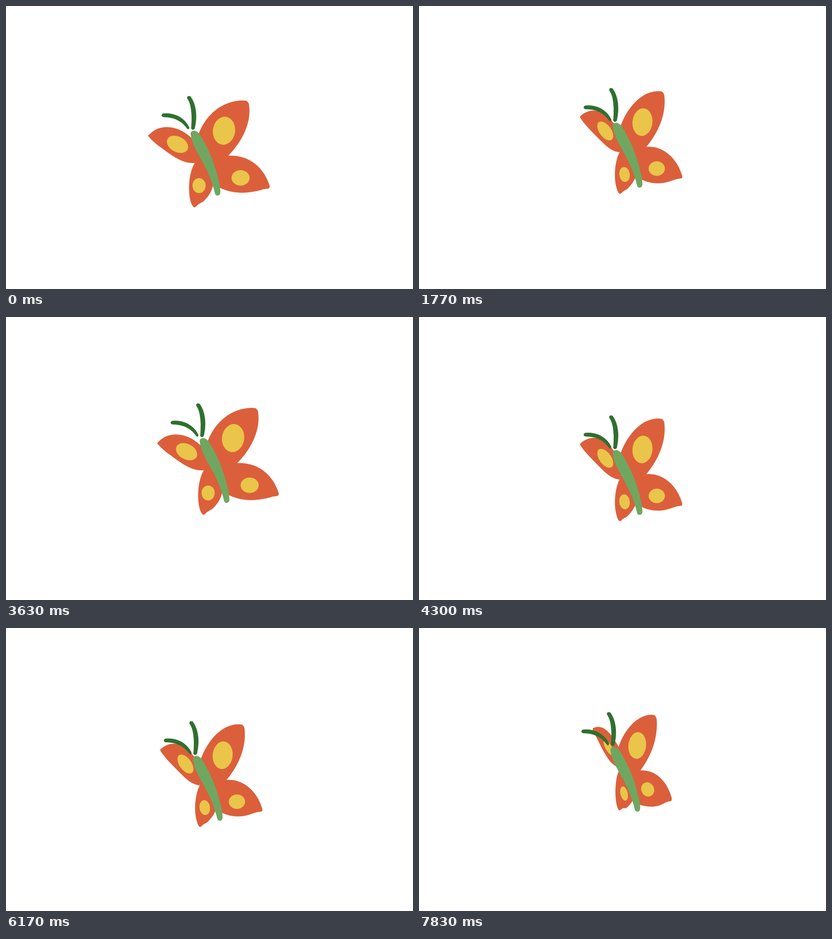
These frames come from a looping animation (897x624 px, 7910 ms). An HTML page:

```html
<!DOCTYPE html>
<html lang="en">
<head>
<meta charset="utf-8">
<title>Butterfly</title>
<style>
  html, body { margin: 0; width: 100%; height: 100%; overflow: hidden; background: #fff; }
  svg { display: block; width: 897px; height: 624px; }
  .wings { fill: #dc5f3b; display: none; }
  .wings.on { display: inline; }
  .wings ellipse { fill: #e9c54a; }
</style>
</head>
<body>
<svg viewBox="0 0 897 624">
  <g id="butterfly">
    <!-- open -->
    <g class="wings">
      <path d="M424 283C438 246 466 219 500 211Q517 207 530 209Q536 213 536 221C540 255 524 295 490 330L455 350Z"/>
      <path d="M490 330C535 328 568 355 581 396Q582 403 576 403C567 403 560 407 553 408C520 415 492 412 468 399L440 335Z"/>
      <path d="M313 286C318 281 325 275 331 272C355 261 385 268 409 291L440 345L416 346C390 348 370 333 340 311C330 304 318 293 313 286Z"/>
      <path d="M416 346C405 364 401 395 405 422Q407 436 413 443Q416 446 421 440C426 435 432 434 437 429C448 418 454 408 457 392L440 335Z"/>
      <ellipse rx="24.5" ry="31" transform="translate(480.5 275) rotate(8)"/>
      <ellipse rx="20" ry="17" transform="translate(517 379)"/>
      <ellipse rx="25" ry="17" transform="translate(378 305) rotate(28)"/>
      <ellipse rx="14.5" ry="16.5" transform="translate(425.5 396)"/>
    </g>
    <!-- half open -->
    <g class="wings">
      <path d="M424 283C436 248 462 216 490 208Q503 204 515 206Q521 210 521 218C524 250 513 290 481 328L455 350Z"/>
      <path d="M481 328C515 325 548 350 560 392Q561 398 556 398C545 399 540 402 533 404C510 412 488 409 468 399L440 335Z"/>
      <path d="M335 261C343 253 352 249 363 248C380 247 397 258 412 280L440 340L423 340C405 339 391 325 379 313C363 297 342 276 335 263Z"/>
      <path d="M422 340C413 357 409 388 414 413Q417 427 421 431Q424 433 428 428C432 424 436 424 440 420C448 412 453 405 458 394L440 335Z"/>
      <ellipse rx="22" ry="30.5" transform="translate(472.5 273.5) rotate(6)"/>
      <ellipse rx="18" ry="16" transform="translate(504 376)"/>
      <ellipse rx="24" ry="13" transform="translate(390.5 293) rotate(54)"/>
      <ellipse rx="11.5" ry="16.5" transform="translate(433 389) rotate(-8)"/>
    </g>
    <!-- nearly closed -->
    <g class="wings">
      <path d="M424 278C436 240 460 213 485 206Q495 203 504 205Q509 210 509 217C511 250 501 290 473 327L455 350Z"/>
      <path d="M473 327C505 325 532 350 542 388Q543 395 538 395C530 396 525 400 518 403C503 409 490 408 468 402L440 335Z"/>
      <path d="M368 234Q374 231 380 231C397 231 411 250 425 275L440 320L421 319C406 311 399 297 390 282C384 270 376 254 368 238Z"/>
      <path d="M425 329C418 345 416 375 420 400Q422 411 426 415Q429 415 433 411C437 409 440 412 444 408C450 403 454 398 457 391L440 325Z"/>
      <ellipse rx="19.5" ry="29.5" transform="translate(466 272) rotate(6)"/>
      <ellipse rx="14" ry="16" transform="translate(489 369) rotate(-25)"/>
      <ellipse rx="19" ry="7" transform="translate(403 277) rotate(60)"/>
      <ellipse rx="8" ry="16" transform="translate(437 378) rotate(-13)"/>
    </g>
    <path fill="#6fa760" d="M407 283Q406 275 415 275Q422 276 426 282C443 308 455 335 464 367C468 382 472 395 472.5 410Q472 418 466 418Q461 418 460 411C456 395 452 382 442 361C432 338 411 312 407 283Z"/>
    <g fill="#2f702f" stroke="#2f702f" stroke-width="2" stroke-linejoin="round">
      <path d="M346 238C370 235 393 247 403 268Q403 272 400 270C387 251 368 244 347 244Q341 242 346 238Z"/>
      <path d="M400 203Q400 198 406 200C419 217 421 245 415 270Q412 274 409 270C410 260 410 250 410 243C409 225 407 213 400 203Z"/>
    </g>
  </g>
</svg>
<script>
const LOOP = 7910, CYCLE = 1100, LEAD = 630;
// Start times of the ten drawings in a cycle; the loop begins LEAD ms into one.
const starts = [0, 100, 200, 330, 430, 530, 630, 760, 860, 960];
const flap = [0, 1, 2, 1];
const path = [[0, 0], [5, 7], [15, 15], [20, 18.5], [20, 9], [20, -8], [20, -17.5], [15, -13], [5, -7]];
const butterfly = document.getElementById('butterfly');
const wings = document.querySelectorAll('.wings');

function stepAt(time) {
  const t = time % LOOP + LEAD;
  const within = starts.filter(s => s <= t % CYCLE).length - 1;
  const n = (Math.floor(t / CYCLE) * 10 + within - 6) % 36;
  return n < 5 ? n : n - 1; // the fifth drawing is held twice
}

function draw(now) {
  const step = stepAt(now);
  wings.forEach((w, i) => w.classList.toggle('on', i === flap[step % 4]));
  butterfly.setAttribute('transform', `translate(${path[step % 9]})`);
}

function tick() {
  draw(performance.now());
  requestAnimationFrame(tick);
}
tick();
</script>
</body>
</html>
```
